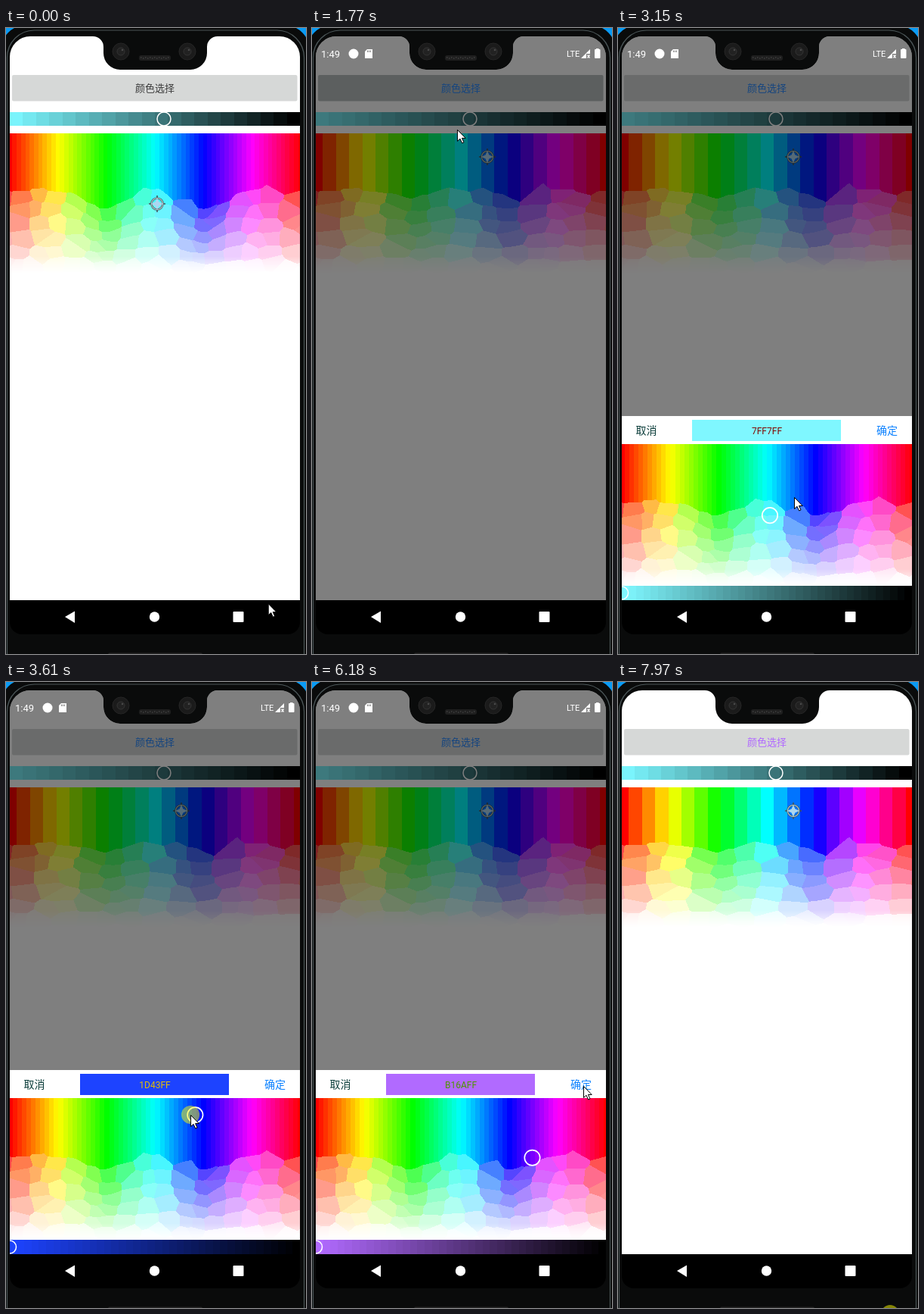
These frames come from a looping animation (397x826 px, 8.14 s). An HTML page with a canvas:

```html
<!DOCTYPE html>
<html lang="zh">
<head>
<meta charset="utf-8">
<style>
html, body { margin: 0; width: 100%; height: 100%; overflow: hidden; background: #0a9bf5; }
canvas { display: block; }
</style>
</head>
<body>
<canvas id="stage" width="397" height="826"></canvas>
<script>
const LOOP = 8140;
const ctx = document.getElementById('stage').getContext('2d');
const LATIN = 'Roboto, sans-serif';
const CJK = '"Noto Sans CJK SC", "Noto Sans CJK", sans-serif';

// Turning points of the pointer: [ms, x, y]
const path = [
  [0, 347, 760], [640, 158, 215], [1000, 232, 170], [1370, 196, 84], [1540, 196, 84],
  [1770, 192, 133], [2150, 178, 458], [2400, 10, 533], [2850, 355, 527], [3230, 201, 643.13],
  [3420, 303, 588], [3570, 250.52, 571.27], [3610, 244, 571], [4300, 291.5, 627.73],
  [4620, 340, 643], [4900, 365, 533], [5300, 349, 598], [5710, 359, 533], [6420, 359, 533],
  [7040, 400, 462], [7585, 400, 782], [7820, 362, 827], [7970, 360, 834]
];
const presses = [[640, 1040], [1540, 1640], [3230, 4350], [5880, 5950], [7970, LOOP]];

const screen = new Path2D('M5 755V38A27 27 0 0 1 32 11H115A14 14 0 0 1 129 25V33A22 22 0 0 0 151 55' +
  'H244A22 22 0 0 0 266 33V25A14 14 0 0 1 280 11H362A27 27 0 0 1 389 38V755Z');
const arrow = new Path2D('M.5 .5V15.5L4 12.3L6.6 18L9 17L6.5 11.5H11.2Z');
const star = new Path2D('M0 -8L2.4 -2.4L8 0L2.4 2.4L0 8L-2.4 2.4L-8 0L-2.4 -2.4Z');

const clamp = (v, lo = 0, hi = 1) => Math.max(lo, Math.min(hi, v));
const ramp = (t, a, b) => clamp((t - a) / (b - a));
const css = c => `rgb(${c})`;
const noise = n => { const v = Math.sin(n * 12.9898) * 43758.5453; return v - Math.floor(v); };

function pointerAt(t) {
  const i = path.findIndex(k => k[0] > t);
  if (i < 0) return path[path.length - 1].slice(1);
  const [t0, x0, y0] = path[i - 1], [t1, x1, y1] = path[i];
  const f = (t - t0) / (t1 - t0);
  return [x0 + (x1 - x0) * f, y0 + (y1 - y0) * f];
}

// Both markers follow the pointer while it drags; the ring lags a little
const crossAt = t => t < 640 ? [200, 232] : pointerAt(Math.min(t, 1000));
const ringAt = t => pointerAt(clamp(t - 40, 3230, 4300));

function tint(hue, white) {
  return [0, 4, 2].map(o => {
    const c = clamp(Math.abs((hue / 60 + o) % 6 - 3) - 1);
    return Math.round(255 * (c + (1 - c) * white));
  });
}

const pick = ([x, y], top, height) => tint((x - 5) / 384 * 360, clamp((y - top) / height));

// Centre of the nearest point in a jittered grid, in grid units
function nearestCell(u, v) {
  let best, min = 9;
  for (let j = Math.floor(v) - 1; j < v + 1; j++) for (let i = Math.floor(u) - 1; i < u + 1; i++) {
    const cx = i + noise(i * 7 + j * 131 + 3), cy = j + .25 + .5 * noise(i * 17 + j * 59 + 5);
    const d = (u - cx) ** 2 + (v - cy) ** 2;
    if (d < min) { min = d; best = [cx, cy]; }
  }
  return best;
}

// Pure hue bands on top, paler irregular cells below; green and blue reach further down
function colorMap(height, bands, sag, cell) {
  const c = document.createElement('canvas');
  c.width = 384;
  c.height = height;
  const g = c.getContext('2d'), img = g.createImageData(384, height);
  for (let x = 0; x < 384; x++) {
    const h = x / 384 * 360;
    const dip = sag * [120, 240].reduce((s, mid) => s + Math.exp(-(((h - mid) / 28) ** 2)), 0);
    const bandHue = Math.round(x / 384 * (bands - 1)) / (bands - 1) * 360;
    for (let y = 0; y < height; y++) {
      const t = y / height, level = t - dip * (1 - t);
      let hue = bandHue, white = 0;
      if (level > .3) {
        const [cx, cy] = nearestCell(x / cell, level * 10);
        if (cy > 4) {
          hue = clamp(cx * cell / 384) * 360;
          white = clamp(.25 + (cy - 4.2) * .13);
        }
      }
      white += (1 - white) * ramp(t, .88, 1);
      img.data.set([...tint(hue, white), 255], (y * 384 + x) * 4);
    }
  }
  g.putImageData(img, 0, 0);
  return c;
}

const fineMap = colorMap(184, 68, .3, 24);
const coarseMap = colorMap(184, 23, .08, 30);
const popupMap = colorMap(187, 64, .2, 24);

function rect(x, y, w, h, fill, r = 0) {
  ctx.fillStyle = fill;
  ctx.beginPath();
  ctx.roundRect(x, y, w, h, r);
  ctx.fill();
}

function circle(x, y, r, fill, stroke, width = 1) {
  ctx.beginPath();
  ctx.arc(x, y, r, 0, 7);
  if (fill) { ctx.fillStyle = fill; ctx.fill(); }
  if (stroke) { ctx.strokeStyle = stroke; ctx.lineWidth = width; ctx.stroke(); }
}

function shape(d, fill) {
  ctx.fillStyle = fill;
  ctx.fill(new Path2D(d));
}

function text(s, x, y, size, fill, family = LATIN, align = 'left') {
  ctx.font = `${size}px ${family}`;
  ctx.textAlign = align;
  ctx.fillStyle = fill;
  ctx.fillText(s, x, y);
}

function shadeBar(y, h, color, steps) {
  for (let i = 0; i < steps; i++) {
    const x = Math.round(5 + i * 384 / steps);
    rect(x, y, 389 - x, h, css(color.map(v => Math.round(v * (1 - i / (steps - 1))))));
  }
}

function phone() {
  rect(0, 0, 397, 826, '#0a9bf5');
  rect(-7, -4, 409, 900, '#0a0b0b', 34);
  ctx.strokeStyle = '#4c5759';
  ctx.lineWidth = 1.2;
  ctx.beginPath();
  ctx.roundRect(1.5, 3, 393, 900, 36);
  ctx.stroke();
  for (const x of [152, 240]) {
    circle(x, 31, 11, '#1b1b1b', '#262626');
    circle(x, 31, 5, '#222', '#343434');
    circle(x + 2, 29, 1.3, '#4a4a4a');
  }
  rect(176, 36, 42, 7, '#1f1f1f', 3);
  for (let x = 178; x < 217; x += 3) rect(x, 38 + x % 2, 1.5, 2, '#383838');
  rect(5, 750, 384, 50, '#000', [0, 0, 16, 16]);
  rect(135, 824.5, 125, 4, '#252525', 2);
  shape('M78 777L91 769.5V785Z', '#fff');
  circle(196.5, 777, 6.7, '#fff');
  rect(300.5, 770, 14, 14, '#fff', 1);
}

function crosshair([x, y]) {
  ctx.save();
  ctx.translate(x, y);
  circle(0, 0, 7.5, null, '#46555b', 2.6);
  ctx.lineWidth = 1.6;
  ctx.stroke(new Path2D('M5 0H11M-5 0H-11M0 5V11M0 -5V-11'));
  circle(0, 0, 7.5, null, '#b4d0d4', 1.1);
  ctx.fillStyle = '#acd6f0';
  ctx.fill(star);
  ctx.restore();
}

function statusBar(dim) {
  text('1:49', 12, 39, 13, '#fff');
  circle(55, 34, 6.5, '#fff');
  shape('M70 31L73 28H80V40H70Z', '#fff');
  for (let x = 73; x < 78; x += 2) rect(x, 29.5, 1, 2.5, `rgba(0,0,0,${dim})`);
  text('LTE', 337, 38, 11, '#fff');
  shape('M356 40L368 28V34H363V40ZM364 36L365 35L368 39L367 40ZM367 35L368 36L365 40L364 39Z', '#fff');
  rect(374, 28, 7.5, 12, '#fff', 1);
  rect(376, 27, 3.5, 2, '#fff');
}

function page(t, picked) {
  rect(0, 0, 397, 755, '#fff');
  rect(8, 62, 377.5, 34.5, t >= 1540 && t < 1900 ? '#b9c0c0' : '#d6d8d7', 2);
  const cross = crossAt(t);
  const label = t < 640 ? '#3c3c3c' : css(t < 6190 ? pick(cross, 139, 184) : picked);
  text('颜色选择', 197, 84, 13, label, CJK, 'center');
  shadeBar(111, 18, [122, 244, 252], 22);
  circle(209, 120, 9, null, '#fff', 1.5);
  ctx.drawImage(t < 1540 ? fineMap : coarseMap, 5, 139);
  crosshair(cross);
}

function popup(ring, color) {
  const hex = color.map(v => v.toString(16).padStart(2, '0')).join('').toUpperCase();
  rect(5, 512, 384, 243, '#fff');
  text('取消', 23.5, 536, 14, '#0b3d3a', CJK);
  text('确定', 342, 536, 14, '#0d82ff', CJK);
  rect(98, 517, 197, 28, css(color));
  text(hex, 197, 536, 12, css(color.map(v => 255 - v)), LATIN, 'center');
  ctx.drawImage(popupMap, 5, 549);
  circle(...ring, 10.2, null, '#fff', 1.7);
  shadeBar(736, 19, color, 40);
  circle(5, 745.5, 8.5, null, '#fff', 1.5);
}

function pointer(t) {
  const [x, y] = pointerAt(t);
  if (presses.some(([a, b]) => t >= a && t < b)) circle(x, y, 12, 'rgba(255,255,0,.5)');
  ctx.save();
  ctx.translate(x, y);
  ctx.fillStyle = '#fff';
  ctx.strokeStyle = '#000';
  ctx.lineWidth = 1;
  ctx.fill(arrow);
  ctx.stroke(arrow);
  ctx.restore();
}

function draw(t) {
  const ring = ringAt(t), picked = pick(ring, 550, 187);
  const leave = ramp(t, 6190, 6330);
  const dim = .5 * (ramp(t, 1545, 1700) - leave);
  const enter = 1 - (1 - ramp(t, 1850, 2110)) ** 2;
  const shown = enter - leave * leave;
  phone();
  ctx.save();
  ctx.clip(screen);
  page(t, picked);
  rect(0, 0, 397, 755, `rgba(0,0,0,${dim})`);
  statusBar(dim);
  if (shown > 0) {
    ctx.translate(0, 243 * (1 - shown));
    popup(ring, picked);
  }
  ctx.restore();
  pointer(t);
}

const start = performance.now();
function tick() {
  draw((performance.now() - start) % LOOP);
  requestAnimationFrame(tick);
}
tick();
</script>
</body>
</html>
```
